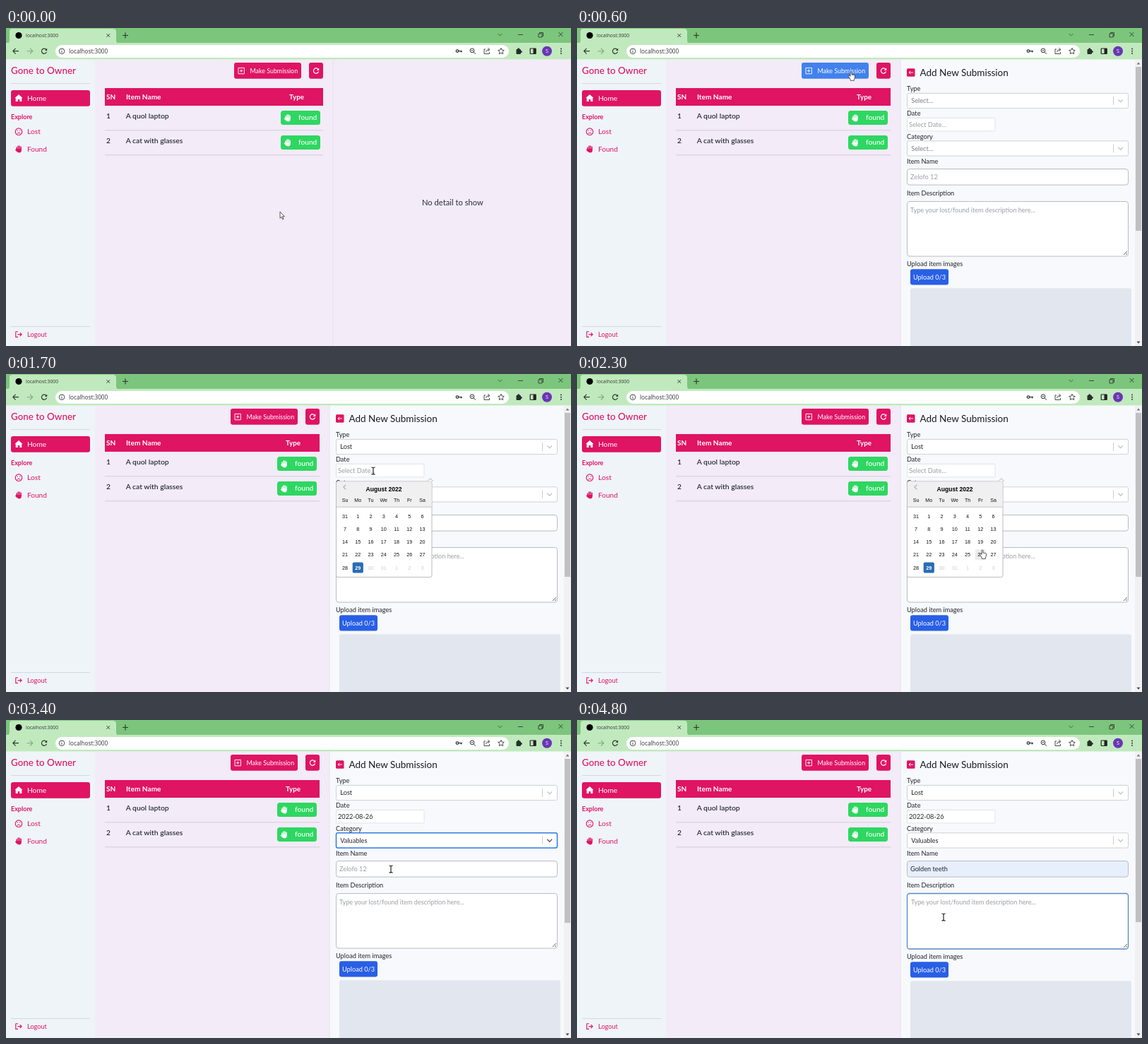
Animation of 800x450 px, one loop 5 s. Source, as an HTML page:

```html
<!DOCTYPE html>
<html lang="en">
<head>
<meta charset="utf-8">
<title>Submission form</title>
<style>
html, body { margin: 0; height: 100%; overflow: hidden; }
svg { display: block; width: 100vw; height: 100vh; font-family: Lato, sans-serif; }
text { white-space: pre; }
.ui { font-family: "Open Sans", sans-serif; }
.arial { font-family: "Liberation Sans", Arial, sans-serif; }
.mid { text-anchor: middle; }
</style>
</head>
<body>
<svg id="stage" viewBox="0 0 800 450"></svg>
<script>
const PINK = '#df1463', INK = '#23242b', GRAY = '#9b9ea6', FOCUS = '#2f7be0';
const LOOP = 5000, STEP = 100;

// time, x, y of the pointer's hot spot
const PATH = [
  [0, 388, 260], [400, 388, 62], [600, 388, 62], [700, 412, 70], [1100, 514, 101], [1200, 512, 104],
  [1300, 505, 121], [1400, 504, 130], [1500, 504, 130], [1600, 508, 134], [1700, 520, 137], [1800, 520, 137],
  [2300, 574, 249], [2400, 573, 248], [2700, 512, 171], [2900, 508, 172], [3000, 508, 213], [3100, 508, 221],
  [3200, 509, 221], [3400, 545, 211], [3700, 545, 211], [3900, 543, 254], [4200, 524, 276], [4300, 519, 279],
  [LOOP, 519, 279]
];

const text = (x, y, s, size = 9.2, fill = INK, more = '') =>
  `<text x="${x}" y="${y}" font-size="${size}" fill="${fill}" ${more}>${s}</text>`;
const rect = (x, y, w, h, fill, r = 0, more = '') =>
  `<rect x="${x}" y="${y}" width="${w}" height="${h}" rx="${r}" fill="${fill}" ${more}/>`;
const line = (d, stroke, w = 1, fill = 'none') =>
  `<path d="${d}" stroke="${stroke}" stroke-width="${w}" fill="${fill}" stroke-linejoin="round"/>`;
const fill = (d, color) => `<path d="${d}" fill="${color}"/>`;
const circle = (x, y, r, color, more = '') => `<circle cx="${x}" cy="${y}" r="${r}" fill="${color}" ${more}/>`;
const at = (x, y, s) => `<g transform="translate(${x} ${y})">${s}</g>`;
const stroke = (color, w = 1) => `stroke="${color}" stroke-width="${w}"`;
const MEDIUM = 'font-weight="500"', BOLD = 'font-weight="700"';

const reload = color => line('M3 -2A3.6 3.6 0 1 0 3.5 1', color, 1.2) + fill('M4.2 -4V-.6H.8Z', color);
const hand = color => line('M-3 1V-2.6M-1 0V-4.5M1 0V-4.5M3 1V-3.2M-3 3L-4.6 .8', color, 1.5) +
  fill('M-3.7 0H3.7V2Q3.7 5.4 .5 5.4Q-2 5.4 -3.7 3Z', color);

function browser() {
  const dark = '#2f3b30';
  return rect(0, 0, 800, 22, '#7cc57c') + rect(0, 21, 800, 23.5, '#c1e9be') +
    fill('M1 22Q5 22 5 17V5Q5 1 9 1H151Q156 1 156 5V17Q156 22 160 22Z', '#c1e9be') +
    circle(18, 10.5, 4.6, '#000') + text(28, 13.2, 'localhost:3000', 6.85, dark, 'class="ui"') +
    line('M142.5 8.3L147 12.8M147 8.3L142.5 12.8', dark, 1) +
    line('M165 10.5H173M169 6.5V14.5', dark, 1.2) +
    line('M696.5 8L699.5 11L702.5 8', '#3f6b40') + line('M725 9.5H732', dark, .9) +
    line('M754 8H759V13H754ZM755.5 8V6.5H760.5V11.5H759', dark, .9) +
    line('M782.5 6L788.5 12M788.5 6L782.5 12', dark, .9) +
    rect(70, 24, 642, 18, '#fff', 9) +
    line('M18 32.7H10M13.6 28.8L9.8 32.7L13.6 36.6', dark, 1.2) +
    line('M29.5 32.7H37.5M34 28.8L37.8 32.7L34 36.6', '#7fa57f', 1.1) + at(54, 32.7, reload(dark)) +
    circle(79, 32.8, 3.8, 'none', stroke(dark, .9)) + line('M79 32.2V35M79 30.4V31.3', dark, .9) +
    text(89, 36, 'localhost:3000', 8.2, '#333', 'class="ui"') +
    circle(639, 32.6, 1.8, 'none', stroke(dark, 1.3)) + line('M641 32.6H646M644.5 32.6V34.6', dark, 1.3) +
    circle(660, 31.8, 2.9, 'none', stroke(dark)) + line('M662.2 34L665 36.8M658.6 31.8H661.4', dark) +
    line('M679 30H677V36.5H684.5V34M679.5 34Q680 30.5 684 30.5M682.3 28.2L685 30.5L682.3 32.8', dark, .9) +
    line('M701 28.4L702.3 31.2L705.3 31.5L703.1 33.6L703.7 36.7L701 35.1L698.3 36.7L698.9 33.6L696.7 31.5L699.7 31.2Z', dark, .9) +
    rect(722.5, 30, 6.5, 7, '#26302a', 1) + circle(725.7, 29.8, 1.5, '#26302a') + circle(729.3, 33.4, 1.5, '#26302a') +
    rect(742.2, 29, 8, 7.5, 'none', .5, stroke('#222', 1.2)) + rect(746.5, 29, 3.7, 7.5, '#222') +
    circle(766, 32.8, 7, '#6a35b5') + text(766, 35.4, 'S', 7.2, '#fff', 'class="ui mid"') +
    [29.5, 32.8, 36.1].map(y => circle(786, y, 1, dark)).join('');
}

function sidebar() {
  return rect(0, 44.5, 126, 406, '#eff4f9') + text(7, 65.3, 'Gone to Owner', 13.4, PINK, MEDIUM) +
    rect(7, 78, 112, 1, '#d3d9e2') + rect(7, 88, 112, 22.7, PINK, 3) +
    fill('M18 94L23.5 99H22.3V104H19.3V101H16.7V104H13.7V99H12.5Z', '#fff') +
    text(30, 103, 'Home', 10.2, '#fff') + text(7, 129.4, 'Explore', 9, PINK, BOLD) +
    circle(18, 146.7, 4.8, 'none', stroke(PINK, 1.1)) +
    line('M15.6 149.4Q18 146.6 20.4 149.4M16.2 144.4V145.8M19.8 144.4V145.8', PINK) +
    text(30, 150, 'Lost', 10.3, PINK) + at(18.2, 171, hand(PINK)) + text(30, 175, 'Found', 10.1, PINK) +
    rect(7, 422, 112, 1, '#d3d9e2') +
    line('M17 429.8H13.8V437.4H17M16.5 433.6H22M19.8 431.2L22.2 433.6L19.8 436', PINK, 1.1) +
    text(30, 436.9, 'Logout', 9.2, PINK);
}

function list(right, hover) {
  const row = (n, name, y) => text(142, y + 3.4, n, 10.2, '#1c1c28', MEDIUM) +
    text(169.7, y + 3.4, name, 10.4, '#1c1c28', MEDIUM) +
    rect(right - 74, y - 8, 56, 20, '#2ed761', 3.5) + at(right - 64, y + 2, hand('#fff')) +
    text(right - 49, y + 5.4, 'found', 10.2, '#fff', MEDIUM) + rect(140, y + 19.3, right - 154, 1, '#d0cdd8');
  return rect(126, 44.5, right - 126, 406, '#f3ebf8') +
    rect(right - 140, 49, 95, 22.7, hover ? '#4281ee' : PINK, 3) +
    line(`M${right - 134} 56.4h8.4v8.4h-8.4ZM${right - 129.8} 58.4v4.4m-2.2 -2.2h4.4`, '#fff', .9) +
    text(right - 117.5, 64, 'Make Submission', 8.9, '#fff') +
    rect(right - 34, 49, 20, 22.7, PINK, 3) + at(right - 24, 60.5, reload('#fff')) +
    rect(140, 85, right - 154, 25, PINK) + text(142, 101.3, 'SN', 10, '#fff', BOLD) +
    text(170, 101.3, 'Item Name', 10.1, '#fff', BOLD) + text(right - 62, 101.3, 'Type', 9.8, '#fff', BOLD) +
    row(1, 'A quol laptop', 125) + row(2, 'A cat with glasses', 160);
}

const select = (y, value, focused) =>
  rect(467.5, y, 313, 21.2, '#fff', 2.2, focused ? stroke(FOCUS, 1.5) : stroke('#cfd1d6')) +
  text(473.3, y + 13.8, value || 'Select...', 9.2, value ? INK : '#7c7d83') +
  line(`M759.5 ${y + 4.5}v12`, '#ccc') +
  line(`M766.3 ${y + 9}l3.4 3.4l3.4 -3.4`, focused ? '#555' : '#c4c4c8', 1.3);

const menu = (y, options, active) =>
  rect(467, y, 314, options.length * 22.6 + 5, '#fff', 2.2, 'filter="url(#shadow)"') +
  options.map((s, i) => (i === active ? rect(467, y + 2.7 + i * 22.6, 314, 22.6, '#deeaff') : '') +
    text(474, y + 17.4 + i * 22.6, s)).join('');

function calendar(x, y) {
  const col = Math.round((x - 480) / 18.27), row = Math.round((y - 201) / 18.25);
  let s = rect(467.5, 152, 135.5, 135.5, '#fff', 2.5, stroke('#b4b4b8', .9)) +
    fill('M468 188V154.5Q468 152.5 470 152.5H600.5Q602.5 152.5 602.5 154.5V188Z', '#f0f0f0') +
    line('M468 188.2H602.5', '#b4b4b8', .8) + line('M596.5 152L600.8 147.6L605 152', '#b4b4b8', .9, '#f0f0f0') +
    line('M481.3 156.8L477.8 160L481.3 163.2', '#b5b5b5', 1.3) +
    text(535, 166, 'August 2022', 8.55, '#000', `class="arial mid" ${BOLD}`);
  ['Su', 'Mo', 'Tu', 'We', 'Th', 'Fr', 'Sa'].forEach((d, i) =>
    s += text(480 + i * 18.27, 181.4, d, 7.1, '#111', 'class="arial mid"'));
  for (let i = 0; i < 35; i++) {
    const cx = 480 + i % 7 * 18.27, cy = 201 + Math.floor(i / 7) * 18.25, today = i === 29;
    const hover = i === row * 7 + col && i < 29;
    if (today || hover) s += rect(cx - 7.6, cy - 7.6, 15.2, 15.2, today ? '#2a6cb5' : '#ececee', 2.2);
    s += text(cx, cy + 2.6, (i + 30) % 31 + 1, 7.2, today ? '#fff' : i > 29 ? '#ccc' : '#111',
      `class="arial mid" ${today ? BOLD : ''}`);
  }
  return s;
}

function form(t, x, y) {
  const nameFocus = t >= 3500 && t < 4500, areaFocus = t >= 4500;
  const preview = t >= 3800 && t < 4300, filled = t >= 4300;
  const shift = nameFocus ? 1 : 0, below = t >= 3500 ? 1 : 0;
  const area = 245.5 + shift, areaHeight = areaFocus ? 78.5 : 77.5;
  const type = t >= 1600 && 'Lost', date = t >= 2400, category = t >= 3200 && 'Valuables';
  const nameLine = preview
    ? text(473, 214.8, y < 265 ? 'Zelofo 15' : 'Golden teeth', 7.4, '#111', 'class="arial"')
    : text(472 + shift, 214.2 + shift, filled ? 'Golden teeth' : 'Zelofo 12', 9.2, filled ? INK : GRAY);
  let s = rect(458, 44.5, 332, 406, '#f7f9fc') + rect(457.5, 44.5, 1, 406, '#e3e4ee') +
    rect(467, 57.3, 11.5, 11.5, PINK, 1.5) + line('M476 63H470M472.2 60.8L470 63L472.2 65.2', '#fff', .9) +
    text(485.5, 67.8, 'Add New Submission', 13.5, '#191a22') +
    text(467, 88.7, 'Type') + select(92.4, type, t >= 1200 && t < 1700) +
    text(467, 123.7, 'Date') + rect(467.5, 127.3, 124.5, 18.6, '#fff', 1.5, stroke('#dfe2e8')) +
    text(470, 140, date ? '2022-08-26' : 'Select Date...', 9.2, date ? INK : GRAY) +
    text(467, 156.5, 'Category') + select(159.8, category, t >= 2700 && t < 3500) +
    text(467, 191.5, 'Item Name') +
    rect(467.5, 199.5, 313, 22.6 + shift, preview || filled ? '#e7effd' : '#fff', 3.5,
      nameFocus ? stroke('#4a82cf', 1.3) : stroke('#b9bcc5')) + nameLine +
    text(467, 237.3 + shift, 'Item Description') +
    rect(467.5, area, 313, areaHeight, '#fff', 3.5, areaFocus ? stroke('#5a86c4', 1.3) : stroke('#b9bcc5')) +
    text(areaFocus ? 473 : 472, area + 15.5, 'Type your lost/found item description here...', 9.1, GRAY) +
    line(`M774 ${area + areaHeight - 2}l5 -5m-2 5l2 -2`, '#555', .9) +
    text(467, 337.3 + below, 'Upload item images') + rect(472, 341.2 + below, 54, 22.4, '#285fe6', 3) +
    text(476, 355.7 + below, 'Upload 0/3', 9.2, '#fff') + rect(472, 368.3 + below, 313, 90, '#e2e7ef', 3) +
    rect(790, 44.5, 10, 406, '#f1f1f3') + rect(791, 55, 8, 232 - below, '#c0c0c2') +
    fill('M792.5 51.5H797.5L795 48.5Z', '#777') + fill('M792.5 443.5H797.5L795 446.5Z', '#444');
  if (t >= 1200 && t < 1600) s += menu(117.8, ['Lost', 'Found'], 0);
  if (t >= 1700 && t < 2400) s += calendar(x, y);
  if (t >= 2700 && t < 3200)
    s += menu(185.4, ['Electronics', 'Valuables', 'Pet', 'Accessories'], t >= 3100 ? 1 : 0) + line('M473.3 165v11', INK, .7);
  if (t >= 3500 && t < 3800) s += line('M473 206v11', INK, .7);
  if (areaFocus && t < 4800) s += line('M473 252v11', INK, .7);
  return s;
}

function pointer(t, x, y, overButton) {
  const overDay = t >= 1700 && t < 2400 && y > 192;
  const overField = t >= 3300 && t < 3800 || t >= 4500 || t === 1700 || t === 1800;
  if (overField) return at(x, y, line('M-2.6 -5Q0 -5 0 -4V4Q0 5 -2.6 5M2.6 -5Q0 -5 0 -4M0 4Q0 5 2.6 5', '#111', 1.1));
  const d = overButton || overDay
    ? 'M0 0Q-1 0 -1 1V6.4L-2.2 5.2C-3.2 4.4 -4.2 5.4 -3.5 6.4L-.8 11V12.3H4.4V11L5.5 8V5Q4.7 4 3.9 4.8Q3.1 3.8 2.4 4.5Q1.7 3.7 1 4.3V1Q1 0 0 0Z'
    : 'M0 0V9.2L2.1 7.2L3.7 10.8L5.1 10.2L3.5 6.7H6.4Z';
  return at(x, y, line(d, '#333', .8, '#fff'));
}

function position(t) {
  const i = PATH.findIndex(p => p[0] > t), [t0, x0, y0] = PATH[i - 1], [t1, x1, y1] = PATH[i];
  const k = (t - t0) / (t1 - t0);
  return [x0 + (x1 - x0) * k, y0 + (y1 - y0) * k];
}

function scene(t) {
  const [x, y] = position(t), open = t >= 600, right = open ? 458 : 463;
  const overButton = t < 700 && y < 72;
  return '<filter id="shadow" x="-5%" y="-20%" width="110%" height="150%"><feDropShadow dx="0" dy="1.5" stdDeviation="1.5" flood-opacity=".2"/></filter>' +
    list(right, overButton) + sidebar() +
    (open ? form(t, x, y) : rect(463, 44.5, 337, 406, '#f3ebf8') + rect(462.5, 44.5, 1, 406, '#e5e0ef') +
      text(589, 251.2, 'No detail to show', 11.2, '#2c2c35')) +
    browser() + pointer(t, x, y, overButton);
}

const stage = document.getElementById('stage');
let shown = -1;
function tick() {
  const t = Math.floor(performance.now() % LOOP / STEP) * STEP;
  if (t !== shown) stage.innerHTML = scene(shown = t);
  requestAnimationFrame(tick);
}
tick();
</script>
</body>
</html>
```
